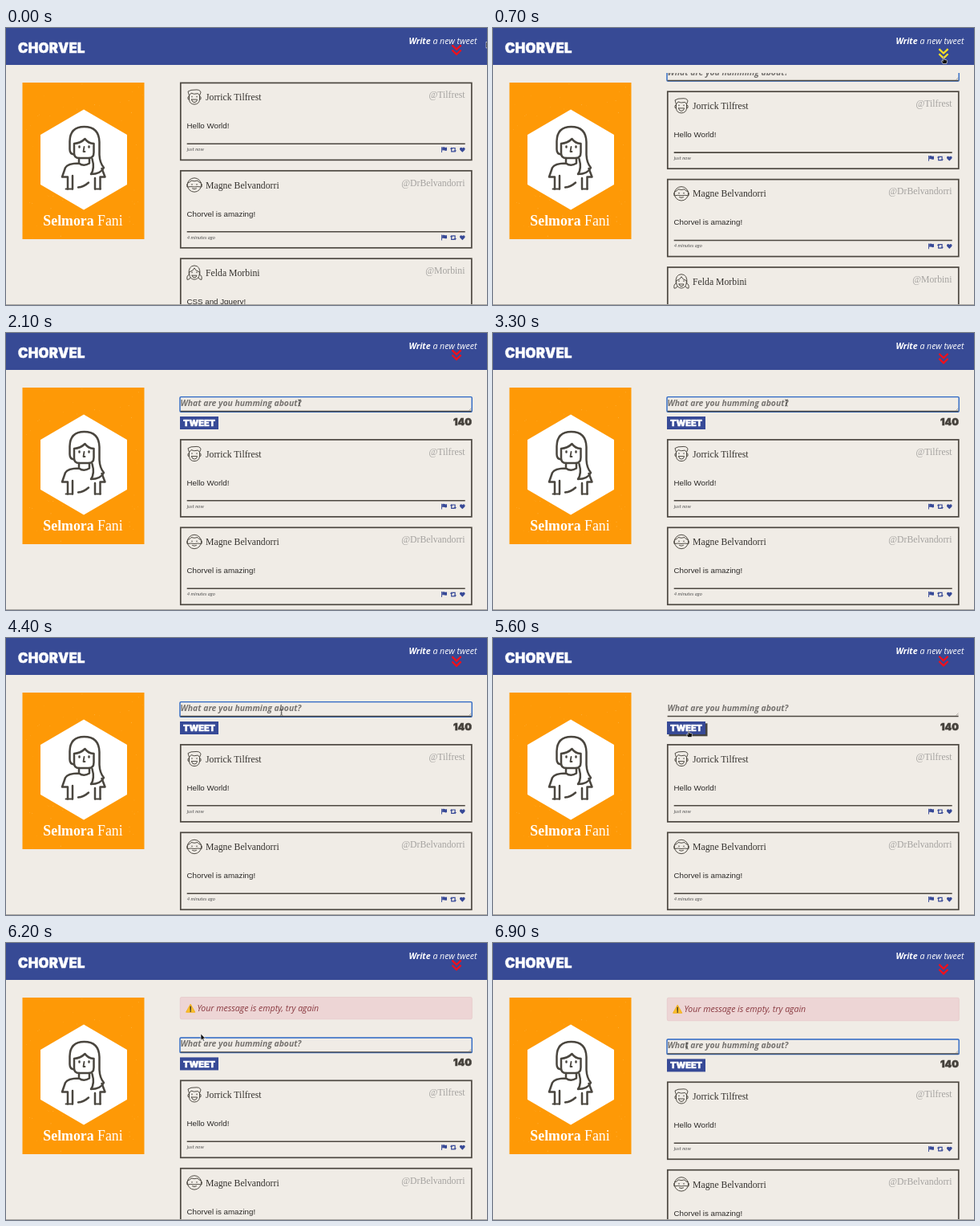
Recreate the animation shown at these times as an HTML page. Size 600 by 345 pixels, loop 7000 ms.

```html
<!DOCTYPE html>
<html lang="en">
<head>
<meta charset="utf-8">
<title>Chorvel</title>
<style>
  html, body { margin: 0; width: 100%; height: 100%; overflow: hidden; background: #f0ece6; }
  svg { display: block; width: 100vw; height: 100vh; }
  .serif { font-family: "Liberation Serif", "Times New Roman", serif; font-size: 11.75px; }
  .sans { font-family: "Liberation Sans", Arial, sans-serif; font-size: 9.75px; }
  .hum { font-family: "Open Sans", "Noto Sans", sans-serif; font-style: italic; font-size: 10.4px; }
  .block { font-family: Inter, "Noto Sans", sans-serif; font-weight: 900; stroke-width: .5; paint-order: stroke; }
  .time { font-family: Lato, "Open Sans", sans-serif; font-style: italic; font-size: 6px; fill: #555; }
  .line { fill: none; stroke: #4a463f; stroke-linecap: round; stroke-linejoin: round; }
</style>
</head>
<body>
<svg viewBox="0 0 600 345" xmlns="http://www.w3.org/2000/svg">
  <defs>
    <clipPath id="formClip"><rect id="formBox" x="215.5" y="56" width="368" height="0"/></clipPath>
    <clipPath id="errorClip"><rect id="errorBox" x="216" y="56" width="367" height="0"/></clipPath>
    <g id="icons" fill="#374997">
      <path d="M543 80.6h.9v6.8h-.9zM544.2 81q1.6-.7 3 0t2.8 0v4q-1.4.7-2.8 0t-3 0z"/>
      <path d="M553.8 83.2l1.8-2.2 1.8 2.2h-1.1v2.5h2.5l1 1.2h-4.7v-3.7zM562 85l-1.8 2.2-1.8-2.2h1.1v-2.5h-2.5l-1-1.2h4.7V85z"/>
      <path d="M569.3 87.2l-2.9-2.9q-1-1.3.1-2.6 1.5-1.1 2.8.4 1.3-1.5 2.8-.4 1.1 1.3.1 2.6z"/>
    </g>
  </defs>

  <rect width="600" height="345" fill="#f0ece6"/>

  <g id="profile">
    <rect x="20.5" y="68" width="152" height="195" fill="#fe9906"/>
    <g id="specks"></g>
    <path d="M97 101.5l54 31.5v62l-54 31.5L43 195v-62z" fill="#fff"/>
    <g class="line" stroke-width="2.5">
      <path d="M85 157.5Q79.500 157 79.500 151V141Q80 123 97.500 123Q116 123 116.500 142V158Q117 168 122 174Q118 182 106 182Q111 175 107.500 163"/>
      <path d="M85 144V156Q85 162 91 162H103Q109.500 162 109.500 155V144Q102 143.500 98.500 138Q93 143.500 85 144"/>
      <path d="M91 162V168.500Q77 168.500 74 174L70 185.500H77V200.500M83 184V200.500M91 168.500Q97 173 104 168.500V162"/>
      <path d="M119.500 175L123.500 185.500H117.500V200.500M111 187V200.500M90 198.500Q97 198 103 192.500"/>
      <path d="M74.500 200.500H83M111 200.500H118" stroke-width="1.800"/>
      <path d="M91.500 147.500v1M103.500 147.500v1"/>
      <path d="M97.500 148L96.500 154H98.500" stroke-width="1.800"/>
    </g>
    <text class="serif" x="96" y="245.500" text-anchor="middle" fill="#fff" style="font-size:17.8px"><tspan font-weight="700">Selmora</tspan> Fani</text>
  </g>

  <g id="cards"></g>

  <g clip-path="url(#formClip)">
    <g id="form">
      <rect id="ring" x="217" y="79.600" width="364.200" height="18.600" rx="1.200" fill="none" stroke="#2a66c4" stroke-width="1.400"/>
      <path d="M217.600 97.500H580.600" stroke="#4c4740" stroke-width="1.300"/>
      <path d="M577.500 96.500l3-3M579.300 96.500l1.200-1.200" stroke="#8b8780" stroke-width=".6"/>
      <text class="hum" x="217.500" y="91" font-weight="700" fill="#767370">What are you humming about?</text>
      <rect id="shadow" x="219.500" y="106.300" width="48" height="16" fill="#45433f"/>
      <rect x="217" y="104" width="48" height="16" fill="#374a97"/>
      <text class="block" x="241" y="116.100" text-anchor="middle" fill="#fff" stroke="#fff" font-size="10.900">TWEET</text>
      <text class="block" x="581" y="115" text-anchor="end" fill="#45413b" stroke="#45413b" font-size="12.300">140</text>
    </g>
  </g>

  <g clip-path="url(#errorClip)">
    <rect id="errorBg" x="217.300" width="364" rx="2" fill="#edd5d5" stroke="#e6c8ca" stroke-width=".8"/>
    <g id="errorText">
      <path d="M230.200 -8.800L235.800 1.200H224.600z" fill="#fbc02a" stroke="#f3b022" stroke-width="1" stroke-linejoin="round"/>
      <path d="M230.200 -5.800v4M230.200 -.2v.5" stroke="#3b3327" stroke-width="1.400" stroke-linecap="round"/>
      <text class="hum" x="238.500" y="0" fill="#8a3a41" style="font-size:10.6px">Your message is empty, try again</text>
    </g>
  </g>

  <rect width="600" height="46" fill="#374a95"/>
  <text class="block" x="15" y="30.700" fill="#fff" stroke="#fff" font-size="16.700" letter-spacing=".3">CHORVEL</text>
  <text class="hum" x="587.500" y="20" text-anchor="end" fill="#fff" style="font-size:10.6px"><tspan font-weight="700">Write</tspan> a new tweet</text>
  <path id="chevron" d="M-5.600 -5.600L0 -.2L5.600 -5.600M-5.600 .6L0 6L5.600 .6" fill="none" stroke-width="2.300"/>
  <rect y="344" width="600" height="1" fill="#aaa7a2"/>

  <g id="cursor">
    <path id="arrow" d="M0 0V8.200L1.900 6.500L3.100 9.200L4.400 8.600L3.200 6H5.700z" fill="#111" stroke="#fff" stroke-width=".6"/>
    <path id="hand" d="M-.7 .3Q0 -.5 .7 .3V3.200L4 4Q4.800 4.300 4.600 5.500L3.800 8.500H-.8L-2.800 5.300Q-2.500 4.200 -.7 5.300z" fill="#111" stroke="#fff" stroke-width=".6"/>
    <path id="beam" d="M-1.700 -4Q0 -4 0 -3Q0 -4 1.700 -4M0 -3V3M-1.700 4Q0 4 0 3Q0 4 1.700 4M-1 1.200H1" fill="none" stroke="#333" stroke-width=".7"/>
  </g>
</svg>
<script>
const LOOP = 7000, OPEN = 540, PRESS = 5540, CLICK = 5686, SLIDE = 600;
const FORM_H = 64.5, ERROR_H = 40.4;
const $ = id => document.getElementById(id);
const clamp = v => Math.max(0, Math.min(1, v));
const smooth = v => { v = clamp(v); return v * v * (3 - 2 * v); };
const swing = v => 0.5 - Math.cos(Math.PI * clamp(v)) / 2;
const show = (id, on) => $(id).setAttribute("visibility", on ? "visible" : "hidden");
const place = (id, x, y) => $(id).setAttribute("transform", `translate(${x} ${y})`);
const set = (id, attrs) => { for (const k in attrs) $(id).setAttribute(k, attrs[k]); };

// small faces, centred on 0,0
const eyes = `<path d="M-3 -.8v.4M3 -.8v.4" stroke-width="1.3"/>`;
const faces = [
  `<path d="M-6.500 -2V3Q-6 8.800 0 9Q6 8.800 6.500 3V-2M-6.500 -1Q-9 -1 -8 2.500L-6.500 3M6.500 -1Q9 -1 8 2.500L6.500 3
    M-6.500 -2L-8 -7Q-4 -9.500 0 -9Q7 -10 8 -6L6.500 -2L4.500 -4.500Q-1 -3 -4 -5L-6.500 -2M-3.600 3H3.600Q3 6.500 0 6.500T-3.600 3"/>`,
  `<circle r="8.700"/><path d="M-8.500 -2.500Q-5 -3 -4 -5.500Q0 -4 4 -5.500Q5 -3 8.500 -2.500M-8.500 2.500Q-4 1.500 0 2.500Q4 1.500 8.500 2.500M-2.500 4.500Q0 6 2.500 4.500M-9.200 -1V2M9.200 -1V2"/>`,
  `<path d="M-6.300 -1V2Q-5.500 8 0 8.300Q5.500 8 6.300 2V-1M-6.800 2Q-8 -8.500 0 -9Q8 -8.500 6.800 2M-6.300 -1Q-1 -2.500 0 -6Q1 -2.500 6.300 -1
    M-6.500 2.500Q-10 3 -9 8.500Q-6 9 -5 6M6.500 2.500Q10 3 9 8.500Q6 9 5 6M-3 3.300H3Q2.500 6 0 6T-3 3.300"/>`
];
const posts = [
  ["Jorrick Tilfrest", "@Tilfrest", "Hello World!", "just now"],
  ["Magne Belvandorri", "@DrBelvandorri", "Chorvel is amazing!", "4 minutes ago"],
  ["Felda Morbini", "@Morbini", "CSS and Jquery!", "10 minutes ago"]
];
$("cards").innerHTML = posts.map(([name, handle, text, time], i) => `
  <g transform="translate(0 ${67.6 + i * 109.4})">
    <rect x="217.800" y=".8" width="363" height="96" fill="none" stroke="#4c4740" stroke-width="1.700"/>
    <g class="line" stroke-width=".95" transform="translate(235 18.500)">${faces[i]}${eyes}</g>
    <text class="serif" x="249" y="22.700" fill="#35322e">${name}</text>
    <text class="serif" x="572.500" y="19.600" text-anchor="end" fill="#a5a3a0">${handle}</text>
    <text class="sans" x="225.500" y="57.700" fill="#2c2a28">${text}</text>
    <path d="M225.700 76.700H572.700" stroke="#4c4740" stroke-width="1.600"/>
    <text class="time" x="225.700" y="85.600">${time}</text>
    <use href="#icons"/>
  </g>`).join("");

let seed = 7;
const rnd = () => (seed = (seed * 16807) % 2147483647) / 2147483647;
$("specks").innerHTML = Array.from({ length: 90 }, () =>
  `<circle cx="${21.5 + rnd() * 150}" cy="${69 + rnd() * 193}" r="${0.2 + rnd() * 0.4}" fill="#ffd48a" opacity=".4"/>`).join("");

// pointer stops: time, x, y
const stops = [
  [0, 599, 17], [480, 563, 35], [700, 562, 36], [820, 560, 37], [1100, 473, 49],
  [1900, 366, 87], [4100, 366, 87], [5200, 244, 115], [5700, 244, 115],
  [6200, 243, 113], [6650, 242, 128], [LOOP, 242, 128]
];
function pointer(t) {
  const i = stops.findIndex(s => s[0] > t);
  const [t0, x0, y0] = stops[i - 1], [t1, x1, y1] = stops[i];
  const k = smooth((t - t0) / (t1 - t0));
  return [x0 + (x1 - x0) * k, y0 + (y1 - y0) * k];
}

function draw(t) {
  const open = swing((t - OPEN) / SLIDE);
  const err = swing((t - CLICK) / SLIDE);
  const [x, y] = pointer(t);
  const h = FORM_H * open, push = ERROR_H * err;

  place("cards", 0, h + push);
  // the focused field keeps the opening form scrolled
  place("form", 0, push - Math.min(32, FORM_H - h));
  set("formBox", { y: 56 + push, height: open < 1 ? h : 70 });
  show("ring", t < PRESS || t >= CLICK);

  const top = 56 + 12 * err;
  set("errorBox", { y: top - 0.5, height: err ? 29 * err + 1 : 0 });
  set("errorBg", { y: top, height: 29 * err });
  place("errorText", 0, top + 9 * err + 9);

  const phase = (t / 2000 + 0.01) % 1;
  const rise = 1 - Math.abs(2 * phase - 1);
  place("chevron", 562, 26.9 + 5.4 * smooth(rise * 1.3 - 0.15));
  const onArrow = x > 555 && x < 570 && y > 20 && y < 42;
  $("chevron").setAttribute("stroke", onArrow ? "#fbe122" : "#f0101c");

  const inForm = open === 1 && x > 217 && x < 581;
  const onButton = inForm && x < 265 && y > 104 + push && y < 120 + push;
  const onField = inForm && y > 79 + push && y < 98 + push;
  show("shadow", onButton);
  show("hand", onArrow || onButton);
  show("beam", onField);
  show("arrow", !onArrow && !onButton && !onField);
  place("cursor", x, y);
}

const start = performance.now();
function tick() {
  draw((performance.now() - start) % LOOP);
  requestAnimationFrame(tick);
}
draw(0);
requestAnimationFrame(tick);
</script>
</body>
</html>
```
